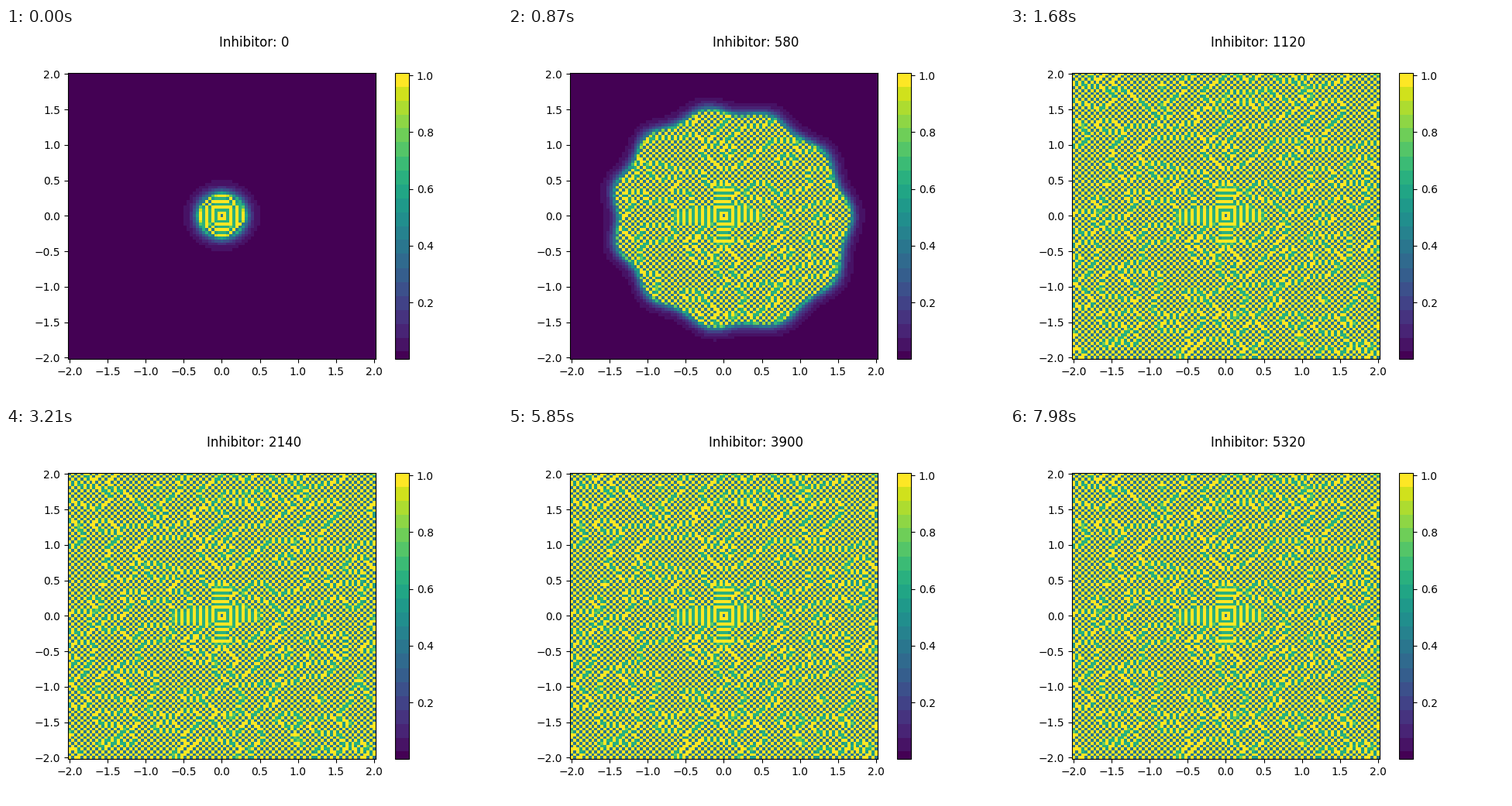
A matplotlib script for the animation above (8 s loop, 640x480 px).

```python
import numpy as np
import matplotlib.pyplot as plt
from matplotlib.animation import FuncAnimation
from matplotlib.colors import ListedColormap

N, HALF = 101, 50
FRAMES, LOOP_MS = 267, 8000
VMIN, VMAX = 0.001, 1.0095
BAND = 0.0487  # share of the colour bar taken by one shade


def banded_viridis(size=1024):
    pos = (np.arange(size) + 0.5) / size
    band = np.floor((1 - pos) / BAND)
    mid = 1 - (band + 0.5) * BAND
    mid[band == 0] = 1
    mid[band == band.max()] = 0
    return ListedColormap(plt.get_cmap("viridis")(mid))


def blur(a, sigma, axis):
    t = np.arange(-12, 13)
    kernel = np.exp(-t**2 / (2 * sigma**2))
    return np.apply_along_axis(np.convolve, axis, a, kernel, mode="same")


def make_pattern(rng):
    """Checkerboard split into random domains, with square rings in the middle."""
    k = np.arange(N) - HALF
    cols, rows = np.meshgrid(k, k)
    domain = blur(blur(rng.normal(size=(N, N)), 1.6, 0), 2.5, 1) > 0
    on = (cols + rows + domain) % 2 == 1
    rings = np.maximum(abs(cols), abs(rows))
    bars = (abs(rows) <= 2) & (abs(cols + 2) <= 14)
    bars |= (abs(cols) <= 2) & (abs(rows) <= 10)
    on = np.where(bars, rings % 2 == 1, on)

    p = np.pad(on, 1, mode="reflect").astype(int)
    near = p[:-2, 1:-1] + p[2:, 1:-1] + p[1:-1, :-2] + p[1:-1, 2:]
    return np.where(on, 1.01, 0.9 - 0.123 * near)


pattern = make_pattern(np.random.default_rng(7))
axis = np.linspace(-2, 2, N)
X, Y = np.meshgrid(axis, axis)
dist = np.hypot(X, Y)
theta = np.degrees(np.arctan2(Y, X))


def wave(amp, count, peak):
    return amp * np.cos(np.radians(count * (theta - peak)))


lobes = wave(0.11, 1, -25) + wave(0.04, 2, 140) + wave(0.045, 11, 1)


def field(n):
    front = 0.33 + 0.036 * n + 0.00019 * n**2 + lobes * min(n / 29, 1)
    depth = front - dist
    fringe = 0.45 * np.exp(np.minimum(depth, 0) / 0.06)
    inside = np.minimum(pattern, 0.45 + 12 * np.maximum(depth, 0))
    return np.where(depth > 0, inside, fringe)


fig, ax = plt.subplots(figsize=(6.4, 4.8), dpi=100)
image = ax.imshow(field(0), cmap=banded_viridis(), vmin=VMIN, vmax=VMAX,
                  origin="lower", extent=(-2.02, 2.02, -2.02, 2.02),
                  aspect="auto", interpolation="nearest")
fig.colorbar(image, ax=ax)
title = fig.suptitle("Inhibitor: 0")


def update(n):
    image.set_data(field(n))
    title.set_text(f"Inhibitor: {20 * n}")
    return image, title


anim = FuncAnimation(fig, update, frames=FRAMES, interval=LOOP_MS / FRAMES,
                     repeat=True, repeat_delay=0, blit=False)
plt.show()
```
